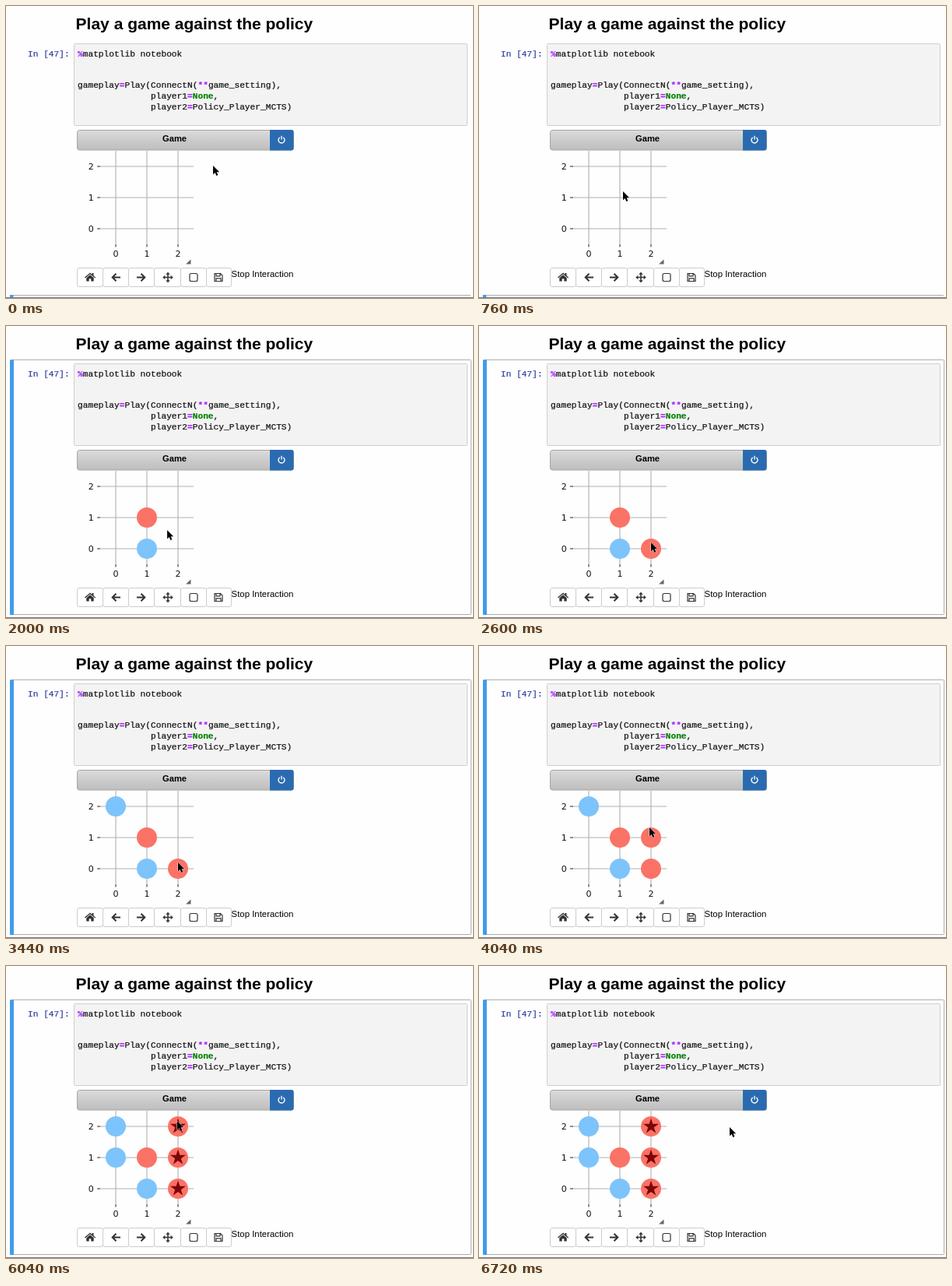
Animation, 600 px wide and 375 px high, one loop 6.76 s. Source, as an HTML page:

```html
<!DOCTYPE html>
<html lang="en">
<head>
<meta charset="utf-8">
<title>Play a game against the policy</title>
<style>
  html, body { margin: 0; width: 100%; height: 100%; overflow: hidden; background: #fefefe; }
  svg { display: block; width: 600px; height: 375px; font-family: "Liberation Sans", Arial, sans-serif; }
  text { white-space: pre; }
  .code { font: 11.2px "Liberation Mono", "Courier New", monospace; fill: #111; stroke: #111; stroke-width: .22px; }
  .code .op { fill: #a2f; stroke: #a2f; font-weight: bold; }
  .code .kw { fill: #008000; stroke: #008000; font-weight: bold; }
  .code.prompt { fill: #303f9f; stroke: #303f9f; }
  .ticks { font: 11.1px "DejaVu Sans", sans-serif; fill: #111; }
  .icon { fill: none; stroke: #333; stroke-width: 2; }
  .solid { fill: #333; stroke: none; }
</style>
</head>
<body>
<svg viewBox="0 0 600 375">
  <defs>
    <linearGradient id="bar" x2="0" y2="1">
      <stop offset="0" stop-color="#dcdcdc"/>
      <stop offset=".5" stop-color="#cbcbcb"/>
      <stop offset="1" stop-color="#bebebe"/>
    </linearGradient>
  </defs>

  <g id="nextCell">
    <path d="M5 371.5H597" stroke="#a9b0b8"/>
    <path d="M5 371h4.5v3h-4.5z" fill="#429bea"/>
  </g>
  <g id="thisCell">
    <rect x="5.5" y="43.5" width="592" height="327" rx="1" fill="none" stroke="#a9b0b8"/>
    <path d="M5 43.5h5v327.5h-5z" fill="#429bea"/>
  </g>
  <path d="M0 374.5H600" stroke="#777"/>

  <text x="89.6" y="30" font-size="21" font-weight="bold">Play a game against the policy</text>
  <rect x="87.5" y="48.5" width="505" height="105" rx="1" fill="#f3f3f4" stroke="#cfcfcf"/>
  <text class="code prompt" x="28" y="64.5">In [47]:</text>
  <g class="code">
    <text x="92" y="64.5"><tspan class="op">%</tspan>matplotlib notebook</text>
    <text x="92" y="105.2">gameplay<tspan class="op">=</tspan>Play(ConnectN(<tspan class="op">**</tspan>game_setting),</text>
    <text x="186" y="119">player1<tspan class="op">=</tspan><tspan class="kw">None</tspan>,</text>
    <text x="186" y="132.6">player2<tspan class="op">=</tspan>Policy_Player_MCTS)</text>
  </g>

  <g id="grid"></g>
  <g id="ticks" class="ticks"></g>
  <g id="discs"></g>

  <rect x="91.5" y="159.5" width="278" height="25.5" rx="3" fill="url(#bar)" stroke="#a5a5a5"/>
  <path d="M339 159H366.5a3 3 0 0 1 3 3V182.5a3 3 0 0 1-3 3H339z" fill="#2a6bb0"/>
  <path d="M351.7 168.7a4 4 0 1 0 4.6 0M354 166.8v4.6" fill="none" stroke="#fff" stroke-width="1.4"/>
  <text x="216.5" y="174" font-size="11.2" font-weight="bold" text-anchor="middle">Game</text>
  <path d="M237.5 325.5v6h-6.500z" fill="#666"/>

  <g id="buttons" fill="#fff" stroke="#ccc"></g>
  <g class="icon">
    <path class="solid" d="M101 348.600l7-6 2.500 2.100v-1.700h2v3.400l2.600 2.200-.9 1-6.200-5.300-6.100 5.300zM103.300 349.200l4.700-4 4.700 4v4.300h-3.400v-3.300h-2.600v3.300h-3.400z"/>
    <path d="M147 348.500h-9.500M141.500 343.700l-4.800 4.800 4.800 4.800"/>
    <path d="M168 348.500h9.500M173.500 343.700l4.800 4.800-4.800 4.800"/>
    <path d="M203 348.500h10M208 343.500v10" stroke-width="1.600"/>
    <path class="solid" d="M208 341.800l2.800 3h-5.600zM208 355.200l2.800-3h-5.600zM201.300 348.500l3-2.800v5.600zM214.700 348.500l-3-2.800v5.600z"/>
    <rect x="236" y="343.500" width="10" height="10" rx="2" stroke-width="1.200"/>
    <path d="M268 343.500h7.500l2.500 2.500v7.500h-10zM270 343.500v3.300h5v-3.300M270 353.500v-3.700h6v3.700" stroke-width="1.200"/>
  </g>
  <text x="289.600" y="348" font-size="11.4">Stop Interaction</text>

  <path id="cursor" d="M0 0V11.200L2.600 8.900 4.400 13 6.400 12.100 4.600 8.200H8.200z"
        fill="#000" stroke="#fff" stroke-width=".9" paint-order="stroke"/>
</svg>
<script>
const LOOP = 6760;
const RED = "#fb7266", BLUE = "#7cc4fb", STAR = "#7d0508";
const $ = id => document.getElementById(id);

function add(parent, tag, attrs, text = "") {
  const el = document.createElementNS("http://www.w3.org/2000/svg", tag);
  for (const key in attrs) el.setAttribute(key, attrs[key]);
  el.textContent = text;
  $(parent).append(el);
  return el;
}

const px = col => 141 + 40 * col;
const py = row => 286 - 40 * row;

function play(el, frames) {
  el.animate(frames, { duration: LOOP, iterations: Infinity });
}

// Hard switch of visibility at one moment of the loop
function switchAt(el, time, before, after) {
  const offset = time / LOOP;
  play(el, [
    { opacity: before, offset: 0 }, { opacity: before, offset },
    { opacity: after, offset }, { opacity: after, offset: 1 }
  ]);
}

for (let i = 0; i < 3; i++) {
  const x = px(i), y = py(i);
  add("grid", "path", { d: `M${x} 186V306M121 ${y}H241`, stroke: "#b0b0b0", "stroke-width": 1.1 });
  add("grid", "path", { d: `M${x} 306v3.500M117 ${y}h4`, stroke: "#222", "stroke-width": 1 });
  add("ticks", "text", { x, y: 322, "text-anchor": "middle" }, i);
  add("ticks", "text", { x: 112.800, y: y + 4.200, "text-anchor": "end" }, i);
}

const edges = [91.500, 124.500, 157.500, 190.500, 224.500, 257.500, 289.500];
edges.slice(1).forEach((right, i) => add("buttons", "rect", {
  x: edges[i], y: 336.500, width: right - edges[i], height: 24, rx: 2.500
}));

// time, column, row, colour
const moves = [
  [1040, 1, 1, RED], [1360, 1, 0, BLUE],
  [2600, 2, 0, RED], [3000, 0, 2, BLUE],
  [4040, 2, 1, RED], [4440, 0, 1, BLUE],
  [5640, 2, 2, RED]
];
for (const [time, col, row, fill] of moves) {
  switchAt(add("discs", "circle", { cx: px(col), cy: py(row), r: 13, fill }), time, 0, 1);
}

function starPoints(cx, cy, radius) {
  return Array.from({ length: 10 }, (_, i) => {
    const r = i % 2 ? radius * 0.382 : radius, a = i * Math.PI / 5;
    return `${cx + r * Math.sin(a)},${cy - r * Math.cos(a)}`;
  }).join(" ");
}
for (let row = 0; row < 3; row++) {
  const star = add("discs", "polygon", { points: starPoints(px(2), py(row), 10.500), fill: STAR });
  switchAt(star, 5640, 0, 1);
}

switchAt($("thisCell"), 1040, 0, 1);
switchAt($("nextCell"), 1040, 1, 0);

// time, x, y of the pointer tip
const path = [
  [0, 266, 205], [60, 266, 205], [680, 185, 238], [1500, 185, 239],
  [2000, 207, 262], [2400, 221, 278], [3440, 221, 278], [3880, 219, 233],
  [4920, 219, 233], [5400, 220, 199], [6080, 220, 199], [6640, 322, 207], [LOOP, 322, 207]
];
play($("cursor"), path.map(([time, x, y]) => ({
  offset: time / LOOP,
  transform: `translate(${x}px, ${y}px)`,
  easing: time === 1500 ? "ease-in" : time === 2000 ? "ease-out" : "ease-in-out"
})));
</script>
</body>
</html>
```
